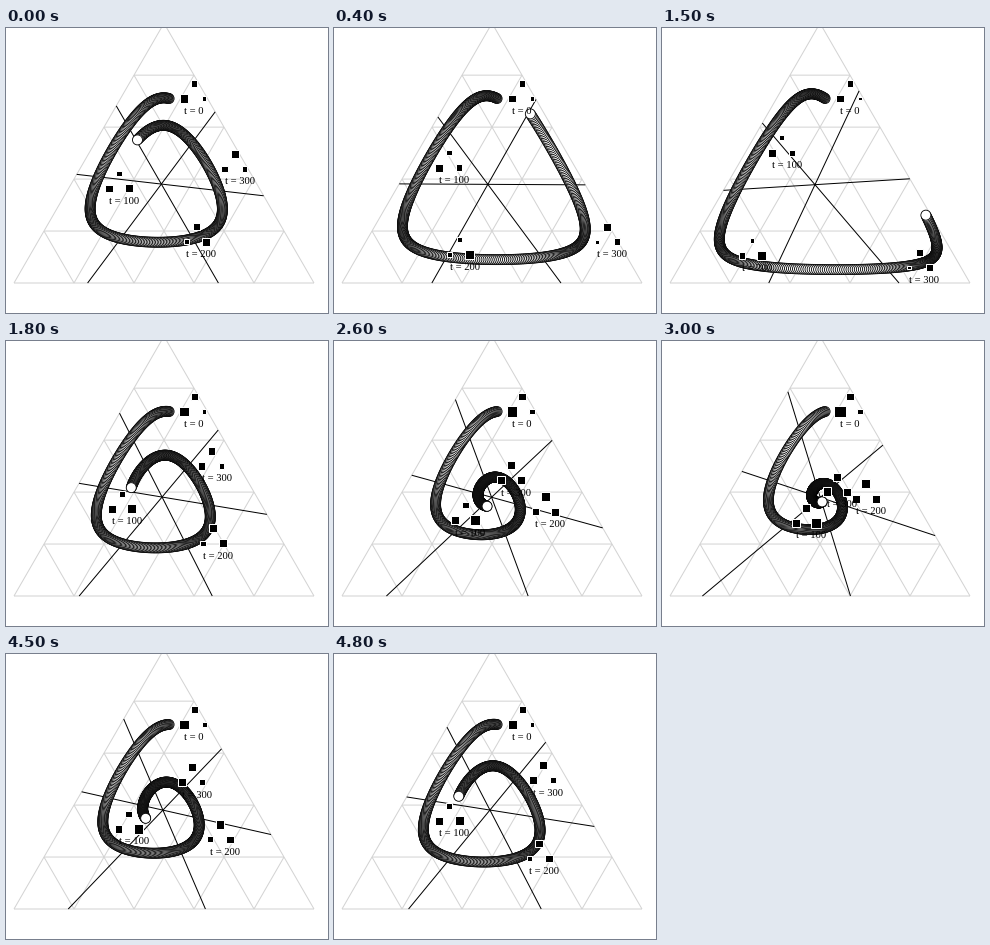
A matplotlib script for the animation above (5300 ms loop, 322 by 285 pixels).

```python
import numpy as np
import matplotlib.pyplot as plt
from matplotlib.animation import FuncAnimation
from matplotlib.collections import EllipseCollection, LineCollection
from matplotlib.patches import Rectangle

W, H, DPI = 322, 285, 100
PX = 72 / DPI
STEP_MS, LOOP_MS = 100, 5300

LEFT, BOTTOM, SIDE = 8, 255, 300
CORNERS = np.array([[LEFT, BOTTOM], [LEFT + SIDE, BOTTOM],
                    [LEFT + SIDE / 2, BOTTOM - SIDE * np.sqrt(3) / 2]])

# Cyclic game: payoff of the row strategy against the column strategy
BASE = np.array([[0, -1.393, 0.610],
                 [1.012, 0, -1.355],
                 [-1.034, 0.557, 0]])
START = np.array([0.128, 0.162, 0.710])
STEPS, RATE = 400, 0.0283
MARKS = range(0, STEPS, 100)
GLYPH = [(15, 0), (35, 0), (25, -15)]

# Bonus for every contest, dragged smoothly between (ms, value) keys
KEYS = [(100, .40), (700, 0), (1400, 0), (1800, .493), (2400, .637),
        (2600, .695), (3100, .81), (3700, .81), (4100, .71), (4400, .71),
        (4600, .497), (4800, .478)]


def bonus_at(ms):
    for (t0, e0), (t1, e1) in zip(KEYS, KEYS[1:]):
        if ms <= t1:
            u = max(ms - t0, 0) / (t1 - t0)
            return e0 + (e1 - e0) * u * u * (3 - 2 * u)
    return KEYS[-1][1]


def payoffs(bonus):
    return (BASE + bonus * (1 - np.eye(3))) / (1 - 0.46 * bonus)


def trajectory(A):
    """Replicator dynamics from the common start."""
    x = START
    path = [x]
    for _ in range(STEPS):
        f = A @ x
        x = x + RATE * x * (f - x @ f)
        path.append(x)
    return np.array(path)


def isocline(A, i, j):
    """Ends of the line on which strategies i and j do equally well."""
    g = A[i] - A[j]
    return [(g[p] * CORNERS[q] - g[q] * CORNERS[p]) / (g[p] - g[q])
            for p, q in ((0, 1), (1, 2), (2, 0)) if g[p] * g[q] < 0]


def grid_lines(n=5):
    lines = []
    for k in range(3):
        top, p, q = np.roll(CORNERS, k, axis=0)
        for s in np.arange(1, n + 1) / n:
            lines.append([top + s * (p - top), top + s * (q - top)])
    return lines


fig = plt.figure(figsize=(W / DPI, H / DPI), dpi=DPI, facecolor="white")
ax = fig.add_axes([0, 0, 1, 1])
ax.set_xlim(0, W)
ax.set_ylim(H, 0)
ax.axis("off")

ax.add_collection(LineCollection(grid_lines(), colors="#d3d3d3",
                                 linewidths=PX, snap=False, zorder=1))
isoclines = LineCollection([], colors="black", linewidths=PX, snap=False,
                           zorder=2)
ax.add_collection(isoclines)

size = np.full(STEPS + 1, 10.0)
trail = EllipseCollection(size, size, np.zeros(STEPS + 1), units="xy",
                          offsets=np.zeros((STEPS + 1, 2)),
                          offset_transform=ax.transData,
                          facecolors="white", edgecolors="black",
                          linewidths=0.85 * PX, zorder=3)
ax.add_collection(trail)

squares = [[ax.add_patch(Rectangle((0, 0), 1, 1, fc="black", ec="white",
                                   lw=PX, zorder=4)) for _ in GLYPH]
           for _ in MARKS]
labels = [ax.text(0, 0, f"t = {t}", family="Liberation Serif",
                  fontsize=10.67 * PX, va="baseline", zorder=5)
          for t in MARKS]


def draw(frame):
    A = payoffs(bonus_at(frame * STEP_MS))
    path = trajectory(A)
    points = path @ CORNERS
    trail.set_offsets(points)
    isoclines.set_segments([isocline(A, i, j)
                            for i, j in ((0, 1), (1, 2), (0, 2))])
    for t, group, label in zip(MARKS, squares, labels):
        x, y = points[t]
        for square, fit, (dx, dy) in zip(group, A @ path[t], GLYPH):
            s = max(6.5 + 3.3 * fit, 1)
            square.set_bounds(x + dx - s / 2, y + dy - s / 2, s, s)
        label.set_position((x + 15, y + 15.5))
    return [isoclines, trail, *sum(squares, []), *labels]


anim = FuncAnimation(fig, draw, frames=LOOP_MS // STEP_MS, interval=STEP_MS,
                     repeat=True, repeat_delay=0)
plt.show()
```
